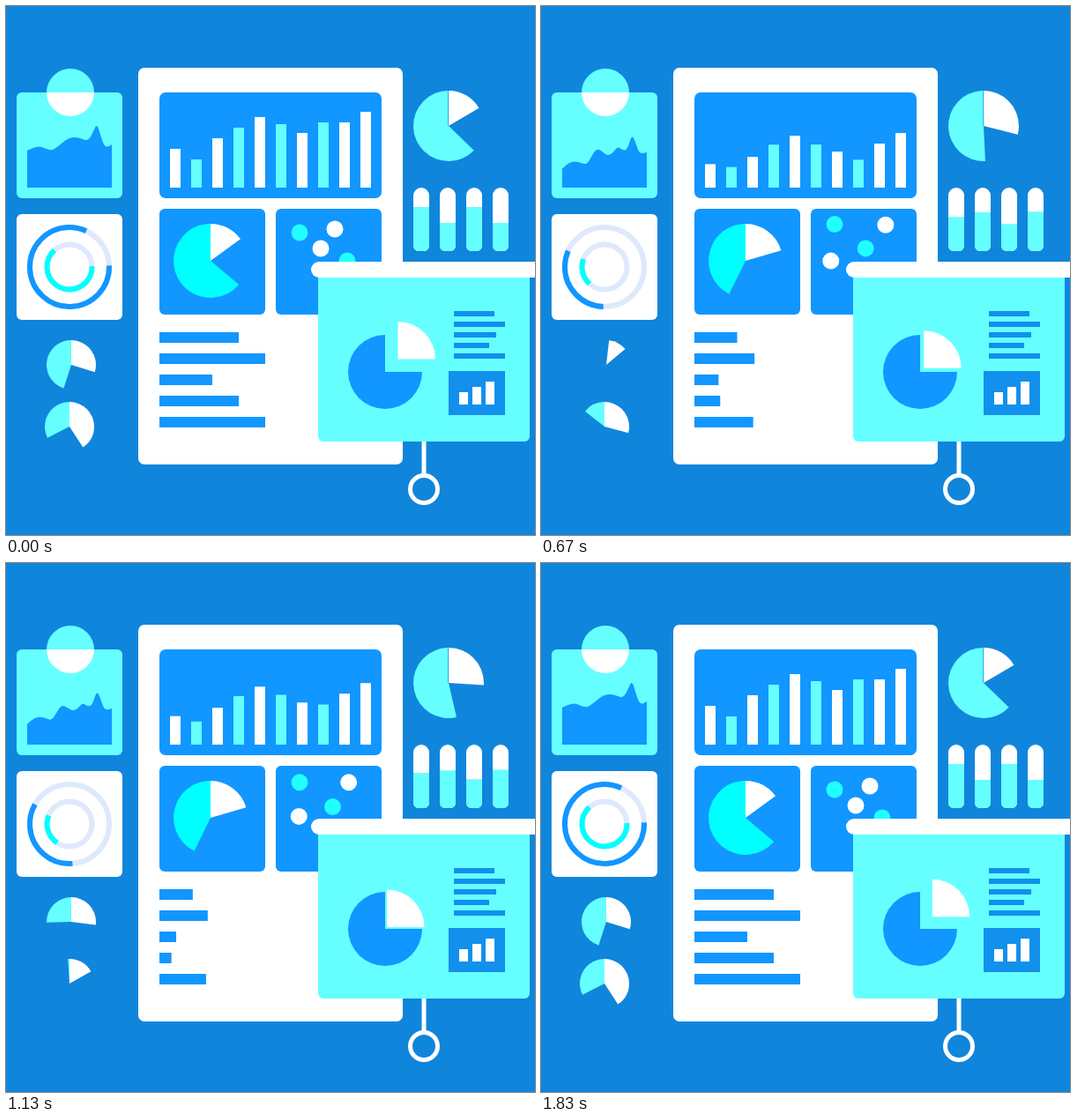
Recreate the animation shown at these times as an HTML page with a canvas. Size 600 by 600 pixels, loop 1870 ms.

```html
<!DOCTYPE html>
<html lang="en">
<head>
<meta charset="utf-8">
<title>Data dashboard</title>
<style>
html, body { margin: 0; height: 100%; overflow: hidden; background: #1085dc; }
canvas { display: block; }
</style>
</head>
<body>
<canvas id="stage" width="600" height="600"></canvas>
<script>
const g = document.getElementById('stage').getContext('2d');
const BG = '#1085dc', BLUE = '#1296ff', DEEP = '#1290ec', WHITE = '#fff';
const CYAN = '#66ffff', AQUA = '#00ffff', TRACK = '#dfe9fc';
const LOOP = 1870, STEP = 1000 / 24;

const unit = x => Math.max(0, Math.min(1, x));
const ease = x => { x = unit(x); return x * x * (3 - 2 * x); };
const mix = (a, b, f) => a + (b - a) * f;
const rad = deg => (deg - 90) * Math.PI / 180;

// Goes 0 -> 1 between a and b, back to 0 between c and d
const swing = (k, a, b, c, d, curve = ease) =>
  curve((k - a) / (b - a)) - curve((k - c) / (d - c));

function box(x, y, w, h, color, r = 0) {
  g.fillStyle = color;
  g.beginPath();
  g.roundRect(x, y, w, h, r);
  g.fill();
}

// Angles in degrees clockwise from twelve o'clock
function sector(x, y, r, from, to, color) {
  if (to <= from) return;
  g.fillStyle = color;
  g.beginPath();
  g.moveTo(x, y);
  g.arc(x, y, r, rad(from), rad(to));
  g.fill();
}

function arc(x, y, r, from, to, color, width = 6) {
  g.strokeStyle = color;
  g.lineWidth = width;
  g.beginPath();
  g.arc(x, y, r, rad(from), rad(to));
  g.stroke();
}

function dot(x, y, r, color) {
  sector(x, y, r, 0, 360, color);
}

// White part opens clockwise from the top, cyan part ends at the top
function pie(x, y, r, whiteEnd, cyanStart, color) {
  sector(x, y, r, cyanStart, 360, color);
  sector(x, y, r, Math.max(0, cyanStart - 360), whiteEnd, WHITE);
}

const HILL_X = [24, 30, 38, 46, 52, 58, 63, 69, 75, 81, 87, 93, 98, 103, 107, 111, 115, 120];
const HILL_A = [164, 161, 159, 162, 164, 160, 156, 151, 149, 149, 151, 153, 145, 133, 146, 158, 160, 157];
const HILL_B = [190, 183, 180, 182, 184, 172, 163, 168, 175, 172, 161, 167, 167, 149, 156, 168, 169, 168];

function clipboard(f) {
  box(12, 98, 120, 120, CYAN, 6);
  dot(73, 98, 27, CYAN);
  sector(73, 98, 27, 90, 270, WHITE);
  const y = HILL_A.map((a, i) => mix(a, HILL_B[i], f));
  g.fillStyle = BLUE;
  g.beginPath();
  g.moveTo(24, 206);
  g.lineTo(24, y[0]);
  for (let i = 1; i < y.length - 1; i++)
    g.quadraticCurveTo(HILL_X[i], y[i], (HILL_X[i] + HILL_X[i + 1]) / 2, (y[i] + y[i + 1]) / 2);
  g.lineTo(120, y[y.length - 1]);
  g.lineTo(120, 206);
  g.fill();
}

function rings(f) {
  box(12, 236, 120, 120, WHITE, 6);
  arc(72, 296, 45, 0, 360, TRACK);
  arc(72, 296, 25.5, 0, 360, TRACK);
  arc(72, 296, 45, mix(88, 201, f), mix(385, 275, f), BLUE);
  arc(72, 296, 25.5, mix(88, 249, f), mix(318, 285, f), AQUA);
}

const BAR_H = [44, 32, 56, 68, 80, 72, 62, 74, 74, 86];
const BAR_DROP = [18, 9, 22, 20, 22, 24, 22, 44, 25, 25];
const LINE_W = [90, 120, 60, 90, 120];
const LINE_DROP = [56, 70, 44, 82, 72];

function report(k) {
  box(150, 70, 300, 450, WHITE, 7);
  box(174, 98, 252, 120, BLUE, 7);
  box(174, 230, 120, 120, BLUE, 6);
  box(306, 230, 120, 120, BLUE, 6);

  const bars = swing(k, 3.7, 17.6, 20, 37.5);
  BAR_H.forEach((full, i) => {
    const h = full - BAR_DROP[i] * bars;
    box(186 + 24 * i, 206 - h, 12, h, i % 2 && i < 9 ? CYAN : WHITE);
  });

  const turn = swing(k, 10, 21.5, 21.5, 33);
  pie(232, 289, 42, mix(54, 91, turn), mix(130, 273, turn), AQUA);

  const drift = swing(k, 2.8, 18.3, 22.9, 38.3);
  dot(333, mix(257, 247, drift), 9.5, '#22ffff');
  dot(mix(373, 392, drift), mix(253, 248, drift), 9.5, WHITE);
  dot(mix(357, 327, drift), mix(275, 290, drift), 9.5, WHITE);
  dot(mix(387, 367, drift), mix(289, 274, drift), 9.5, '#22ffff');

  const lines = swing(k, 1, 23.5, 25, 37.5);
  LINE_W.forEach((w, i) => box(174, 370 + 24 * i, w - LINE_DROP[i] * lines, 12, BLUE));
}

function tubes(f) {
  const levels = [[228, 242], [246, 231], [228, 252], [246, 230]];
  levels.forEach(([a, b], i) => {
    const x = 462 + 30 * i, y = mix(a, b, f);
    box(x, 206, 18, 72, WHITE, [9, 9, 6, 6]);
    box(x, y, 18, 278 - y, CYAN, [0, 0, 6, 6]);
  });
}

function board(f) {
  box(354, 298, 240, 196, CYAN, 6);
  box(346, 290, 270, 18, WHITE, 9);
  box(471.5, 494, 5, 38, WHITE);
  arc(474, 548, 15.5, 0, 360, WHITE, 5);
  sector(430, 415, 42, 90, 360, BLUE);
  const out = 14.5 * (1 - f);
  sector(430 + out, 415 - out, 42.5, 0, 90, WHITE);
  [46, 58, 48, 40, 58].forEach((w, i) => box(508, 346 + 12 * i, w, 6, DEEP));
  box(502, 414, 64, 50, DEEP);
  [14, 20, 26].forEach((h, i) => box(514 + 15 * i, 452 - h, 10, h, WHITE));
}

function draw(now) {
  const k = Math.floor((now % LOOP + 4) / STEP);
  box(0, 0, 600, 600, BG);

  const level = swing(k, 2.1, 21.6, 21.8, 36.8);
  clipboard(level);
  rings(swing(k, -0.8, 22, 22, 38.3) * (k ? 1 : 0));

  const upper = swing(k, 0, 16.5, 17, 35);
  pie(74, 407, 28, mix(107, 50, upper ** 2), mix(198, 367, upper), CYAN);
  const lower = swing(k, 8, 23.5, 23.5, 43);
  pie(72, 477, 28, mix(147, 50, lower ** 1.3), mix(243, 367, lower), CYAN);

  report(k);

  const side = swing(k, 2.5, 19.3, 20.5, 38);
  pie(502, 136, 40, mix(59.5, 109, side), mix(134, 182, side), CYAN);
  box(501.4, 96, 0.8, 40, BG);
  tubes(level);
  board(swing(k, -1, 23, 24, 45, unit) * unit(k / 3));

  requestAnimationFrame(draw);
}
requestAnimationFrame(draw);
</script>
</body>
</html>
```
